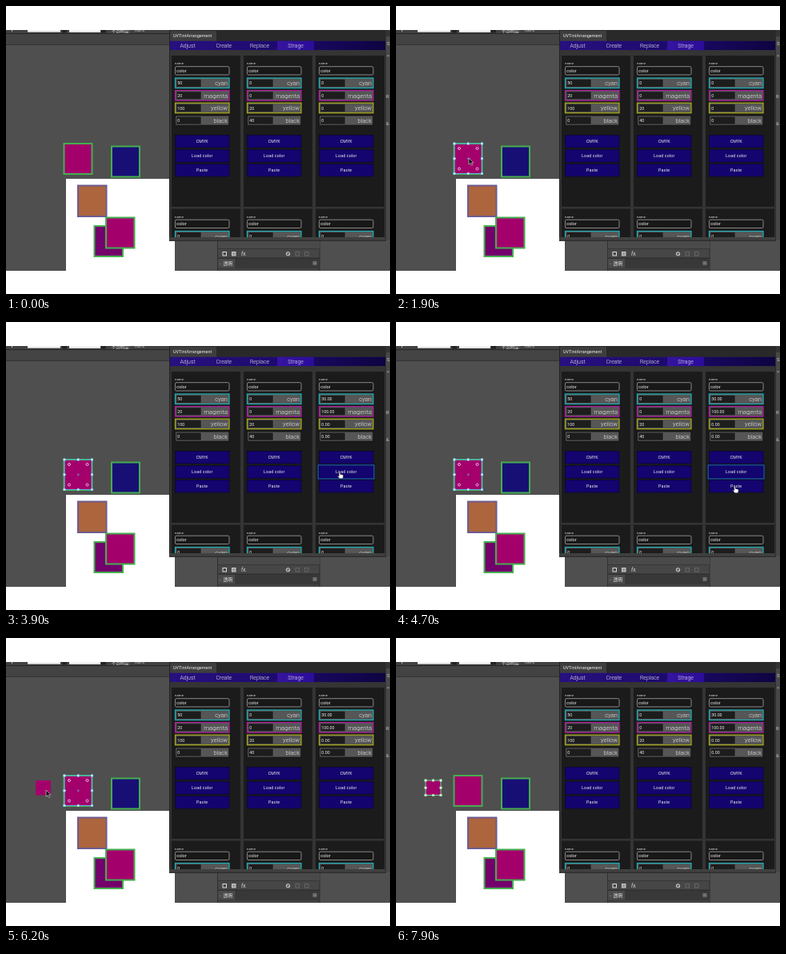
Animation of 480 by 360 pixels, one loop 8000 ms. Source, as an HTML page:

```html
<!DOCTYPE html>
<html lang="en">
<head>
<meta charset="utf-8">
<title>Colour panel</title>
<style>
html, body { margin: 0; width: 100%; height: 100%; overflow: hidden; background: #fff; }
svg { display: block; width: 480px; height: 360px; font-family: Roboto, "Liberation Sans", "Noto Sans CJK JP", sans-serif; }
text { white-space: pre; }
</style>
</head>
<body>
<svg id="stage" viewBox="0 0 480 360" xmlns="http://www.w3.org/2000/svg"></svg>
<script>
const stage = document.getElementById('stage');
const LOOP = 8000, STEP = 100;

const rect = (x, y, w, h, fill, extra = '') =>
  `<rect x="${x}" y="${y}" width="${w}" height="${h}" fill="${fill}" ${extra}/>`;
const text = (x, y, size, str, fill = '#eee', extra = '') =>
  `<text x="${x}" y="${y}" font-size="${size}" fill="${fill}" ${extra}>${str}</text>`;
const line = (d, stroke, width = 1) =>
  `<path d="${d}" fill="none" stroke="${stroke}" stroke-width="${width}"/>`;
const group = (id, body, hidden = true) =>
  `<g id="${id}" ${hidden ? 'visibility="hidden"' : ''}>${body}</g>`;

const GREEN = '#45ad50', MAGENTA = '#a4006c', NAVY = '#13046f';
const swatch = (x, y, w, h, fill, stroke = GREEN) =>
  rect(x, y, w, h, fill, `stroke="${stroke}" stroke-width="2"`);

// Selection frame with eight handles
function frame(x, y, w, h, color, size) {
  let out = rect(x, y, w, h, 'none', `stroke="${color}" stroke-width="1"`);
  for (let i = 0; i < 3; i++) for (let j = 0; j < 3; j++) {
    if (i === 1 && j === 1) continue;
    out += rect(x + w * i / 2 - size / 2, y + h * j / 2 - size / 2, size, size, '#fff',
      `stroke="${color}" stroke-width=".6"`);
  }
  return out;
}

function workspace() {
  return rect(0, 30, 480, 301, '#4f4f4f') +
    rect(0, 30, 205, 4.5, '#424242') +
    rect(0, 34, 205, 1.2, '#252525') +
    rect(0, 35, 205, 13, '#434343') +
    rect(0, 48, 205, 1, '#333') +
    rect(27, 29, 41, 3.6, '#f4f4f4') + rect(79, 29, 39, 3.8, '#f4f4f4') +
    rect(7, 30, 1, 2, '#bbb') +
    rect(70, 30, 6, 3.5, '#222') + rect(119, 30, 6, 3.5, '#222') +
    text(132, 32.8, 5.4, '不透明度:', '#ddd') + text(160, 32.4, 5.4, '100%', '#ddd') +
    rect(75, 216, 136, 115, '#fff') +
    swatch(72.5, 172, 35, 38, MAGENTA) +
    swatch(132, 175.5, 35, 38, '#180f75') +
    swatch(90, 224.5, 35.5, 38.5, '#ad653d', '#6d5b91') +
    swatch(110.5, 275, 35.5, 38, '#73006b') +
    swatch(125, 264.5, 35.5, 38, MAGENTA);
}

function dock() {
  return rect(264.5, 290, 128, 41, '#464646') +
    rect(264, 290, 1, 41, '#303030') + rect(391.5, 290, 1, 41, '#303030') +
    rect(265, 293, 127, 10.5, '#4a4a4a') + rect(265, 303, 127, 1, '#363636') +
    rect(271, 307.5, 4.5, 4.5, 'none', 'stroke="#ddd" stroke-width="1"') +
    rect(282.5, 307.5, 4.5, 4.5, '#999', 'stroke="#ccc" stroke-width="1"') +
    text(294, 312, 6.5, 'fx.', '#ddd', 'font-style="italic"') +
    '<circle cx="352.5" cy="309.8" r="2.2" fill="none" stroke="#ddd"/>' +
    line('M351 308.3l3 3', '#ddd', .8) +
    rect(362, 307.5, 4.5, 4.5, 'none', 'stroke="#666"') +
    rect(373.5, 307.5, 4.5, 4.5, 'none', 'stroke="#666"') +
    rect(265, 314.5, 127, 1.5, '#303030') + rect(265, 316, 127, 11.5, '#383838') +
    rect(265, 316, 21, 12, '#4a4a4a') +
    text(267, 323.5, 5, '◦', '#ddd') + text(271.5, 323.8, 5.8, '透明', '#eee') +
    line('M383.5 319.8h5M383.5 321.5h5M383.5 323.2h5', '#bbb', .7) +
    rect(265, 327.5, 127, 1, '#363636');
}

const INKS = [['cyan', '#20a9b0'], ['magenta', '#a81b9c'], ['yellow', '#a3a51c'], ['black', '#161616']];
const BUTTONS = [['CMYK', 161.5], ['Load color', 179.7], ['Paste', 197.5]];

function card(x, dy, values, key) {
  let out = rect(x - 4, 62 + dy, 86, 189, '#1b1b1b') +
    text(x, 73.2 + dy, 4.4, 'name', '#ddd') +
    rect(x + .5, 75.7 + dy, 67.5, 10.3, '#181818', 'rx="1.5" stroke="#a5a5a5" stroke-width=".8"') +
    text(x + 2, 82.6 + dy, 5.7, 'color');
  INKS.forEach(([ink, edge], i) => {
    const y = 90 + i * 15.6 + dy;
    out += rect(x + .5, y, 67.5, 12.5, '#565656', `stroke="${edge}" stroke-width="1.3"`) +
      rect(x + 2, y + 1.3, 31, 9.9, '#1d1d1d', 'stroke="#686868" stroke-width=".5"') +
      text(x + 3.3, y + 8.4, 5.3, values[i], '#f2f2f2', `class="${key}"`) +
      text(x + 66, y + 9.1, 7.6, ink, '#eee', 'text-anchor="end" font-weight="300"');
  });
  BUTTONS.forEach(([label, y]) => {
    out += rect(x + .5, y + dy, 67.5, 15.5, NAVY, 'stroke="#090337" stroke-width=".7"') +
      text(x + 34.2, y + 9.6 + dy, 5.3, label, '#eee', 'text-anchor="middle" letter-spacing=".15"');
  });
  return out;
}

function panel() {
  const tabs = [['Adjust', 227], ['Create', 272.3], ['Replace', 317], ['Strage', 362]];
  const xs = [211, 301, 391];
  const rows = [[50, 20, 100, 0], [0, 0, 20, 40], [0, 0, 0, 0]];
  return rect(204, 30, 271, 263.5, '#383838') +
    rect(204, 30, 1, 263.5, '#222') +
    rect(205, 30, 270, 13.7, '#292929') + rect(205, 31, 58, 13, '#3e3e3e') +
    text(209, 39.2, 5.5, 'UVTintArrangement', '#eee') +
    rect(205, 43.7, 269.5, 11.6, 'url(#nav)') + rect(339, 43.7, 46, 11.6, 'url(#active)') +
    tabs.map(([s, x]) => text(x, 52.1, 6.9, s, '#eee', 'text-anchor="middle" font-weight="300"')).join('') +
    rect(205, 55.3, 269.5, 234, '#343434') +
    '<g clip-path="url(#view)">' +
    xs.map((x, i) => card(x, 0, rows[i], 'v' + i) + card(x, 191.5, [0, 0, 0, 0], 'w')).join('') +
    '</g>' +
    rect(204, 289, 271, 4.3, '#404040') + rect(204, 292.7, 271, 1, '#262626') +
    rect(474.5, 30, 5.5, 263, '#474747') + rect(474.2, 30, .8, 263, '#292929') +
    rect(475, 30, 5, 8, '#333') +
    text(476, 49, 6, 'S', '#ccc') + text(476, 64, 6, '&gt;', '#ccc') +
    text(475, 114.5, 6, 'R', '#ccc') + text(475, 149, 6, '&amp;', '#bbb');
}

const dots = [[79, 178], [101.5, 178], [79, 203.5], [101.5, 203.5]]
  .map(([x, y]) => `<circle cx="${x}" cy="${y}" r="1.5" fill="${MAGENTA}" stroke="#e5cdec" stroke-width=".9"/>`).join('');

stage.innerHTML =
  `<defs>
    <linearGradient id="nav"><stop stop-color="#281080"/><stop offset=".5" stop-color="#1d0a6d"/><stop offset="1" stop-color="#0e0342"/></linearGradient>
    <linearGradient id="active"><stop stop-color="#3614a0"/><stop offset="1" stop-color="#2b0c9a"/></linearGradient>
    <clipPath id="view"><rect x="205" y="56" width="270" height="233.3"/></clipPath>
  </defs>` +
  workspace() +
  group('hover', rect(132, 175.5, 35, 38, 'none', 'stroke="#3f8fb8" stroke-width=".8"') +
    line('M148.5 194.5h2.4M149.7 193.3v2.4', '#5b9be8', .7)) +
  group('picked', frame(73, 172, 34.5, 37.5, '#5bb4df', 2.5) + dots +
    line('M88.8 190.8h3M90.3 189.3v3', '#6e9be8', .7)) +
  group('pasted', rect(37, 178, 19, 18.5, MAGENTA)) +
  group('pastedFrame', frame(37, 178, 19, 18.5, '#79d58b', 2.5)) +
  dock() + panel() +
  group('focus', rect(390.3, 0, 69.6, 17, 'none', 'stroke="#1556bd" stroke-width="1.2"')) +
  group('arrow', '<path d="M0 0v8.2l2-1.8 1.4 3 1.4-.7-1.4-2.8h2.6z" fill="#111" stroke="#ddd" stroke-width=".6"/>') +
  group('hand', '<path d="M-.8.5q.8-1 1.6 0v2.7l3 .7q1 .3.9 1.3l-.6 3.6h-4l-2.6-3q.3-1.2 1.7-.1z" fill="#fff" stroke="#222" stroke-width=".6"/>') +
  group('scale', '<path d="M-2.4 0l1.6 2.4-1.6 2M2.4 0l-1.6 2.4 1.6 2" fill="none" stroke="#ddd" stroke-width=".9"/>') +
  rect(0, 0, 480, 30, '#fff') + rect(0, 331, 480, 29, '#fff');

const $ = id => document.getElementById(id);
const show = (id, on) => $(id).setAttribute('visibility', on ? 'visible' : 'hidden');
const loaded = [...document.querySelectorAll('.v2')];

// Pointer path: time, x, y
const PATH = [
  [600, 290, 222], [1000, 146, 191], [1100, 112, 184.5], [1400, 91, 190], [1900, 91, 190],
  [2600, 402, 194], [2700, 403, 194], [3100, 417, 187], [4100, 417, 187], [4600, 423.5, 205],
  [5500, 423.5, 205], [6200, 50, 190], [6500, 48, 190], [6800, 47, 198], [6900, 47, 198], [7200, -8, 215]
];

function pointer(t) {
  const i = PATH.findIndex(p => p[0] > t);
  if (i < 1) return null;
  const [t0, x0, y0] = PATH[i - 1], [t1, x1, y1] = PATH[i];
  const k = (t - t0) / (t1 - t0), e = k * k * (3 - 2 * k);
  return [x0 + (x1 - x0) * e, y0 + (y1 - y0) * e];
}

const VALUES = ['30.00', '100.00', '0.00', '0.00'];

function draw(t) {
  const between = (a, b) => t >= a && t < b;
  show('hover', between(900, 1200));
  show('picked', between(1500, 6300));
  show('pasted', t >= 4900);
  show('pastedFrame', t >= 6300);
  loaded.forEach((el, i) => { el.textContent = t >= 3400 ? VALUES[i] : '0'; });

  show('focus', between(3300, 6000));
  $('focus').setAttribute('transform', `translate(0 ${t < 4800 ? 178.9 : 196.7})`);

  const p = pointer(t);
  const over = p && p[0] > 390 && p[0] < 460 && p[1] > 160 && p[1] < 214;
  const kind = !p ? '' : over ? 'hand' : between(6700, 7000) ? 'scale' : 'arrow';
  for (const id of ['arrow', 'hand', 'scale']) {
    show(id, id === kind);
    if (id === kind) $(id).setAttribute('transform', `translate(${p[0]} ${p[1]})`);
  }
}

const start = performance.now();
function tick() {
  const t = (performance.now() - start) % LOOP;
  draw(Math.floor(t / STEP) * STEP);
  requestAnimationFrame(tick);
}
tick();
</script>
</body>
</html>
```
